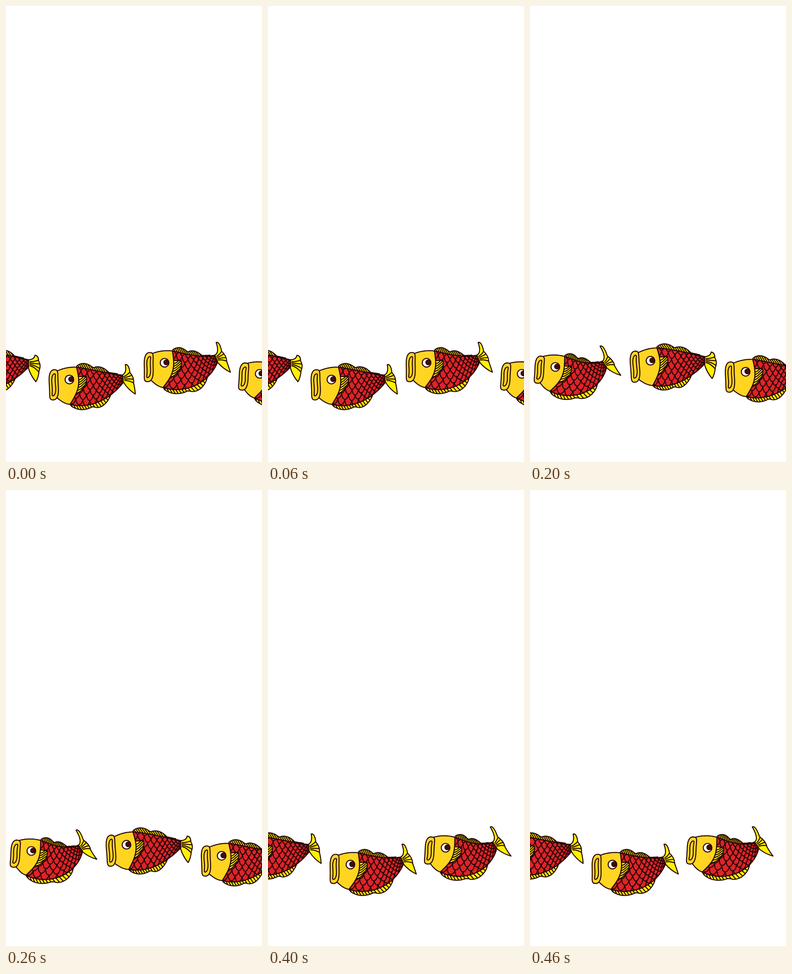
These frames come from a looping animation (561x998 px, 0.5 s). An HTML page with a canvas:

```html
<!DOCTYPE html>
<html lang="en">
<head>
<meta charset="utf-8">
<title>Swimming fish</title>
<style>
  html, body { margin: 0; width: 100%; height: 100%; overflow: hidden; background: #fff; }
  canvas { display: block; }
</style>
</head>
<body>
<canvas id="stage" width="561" height="998"></canvas>
<script>
const ctx = document.getElementById('stage').getContext('2d');
const { sin, cos, abs, max, sign, PI } = Math;
const INK = '#240606', RED = '#dd2429', GOLD = '#ffd522', YELLOW = '#fff200';
const SPINE = 119, RAD = PI / 180;

// Angles of the body at the eye, of the body at the tail joint, and of the tail fin
const POSES = [
  { head: 18, end: -34, tail: -34 },
  { head: 9, end: -24, tail: -24 },
  { head: 4, end: -7, tail: -17 },
  { head: 0, end: 0, tail: 0 },
];
const LANES = [805, 783, 822, 790];

// Outlines are measured from the eye, on a straight spine
const mix = (a, b, t) => a + (b - a) * t;
const lobe = (x, from, to) => x > from && x < to ? sin(PI * (x - from) / (to - from)) ** .6 : 0;
const back = x => -28 + 19 * max(0, (x - 14) / 105) ** 1.3;
const belly = x => { const u = (x - 5) / 114; return 54 + 20 * u - 67 * u * u; };
const dorsal = x => back(x) - max(1.5, 11 * lobe(x, 13, 56), 10 * lobe(x, 48, 88));
const anal = x => belly(x) + max(9 * lobe(x, 5, 62), 13 * lobe(x, 50, 89));
const crown = x => -28 + 14 * ((14 - x) / 48) ** 2;
const chin = x => 38 + 16 * sin((x + 30) / 35 * PI / 2);
const gill = y => { const t = (y + 28) / 82; return mix(14, 5, t) + 11 * sin(PI * t); };
const pectoral = y => gill(y) + 18 * (1 - ((y + 9) / 42) ** 2);

const sample = (from, to, at, n = 24) => Array.from({ length: n + 1 }, (_, i) => at(mix(from, to, i / n)));
const along = (f, from, to) => sample(from, to, x => [x, f(x)]);
const down = (f, from, to) => sample(from, to, y => [f(y), y]);

const BODY = [...along(back, 14, SPINE), ...along(belly, SPINE, 5), ...down(gill, 54, -28)];
const DORSAL = [...along(dorsal, 14, 108), ...along(back, 108, 14)];
const ANAL = [...along(anal, 5, 90), ...along(belly, 90, 5)];
const HEAD = [...along(crown, -34, 14), ...down(gill, -28, 54), ...along(chin, 5, -30)];
const PECTORAL = [...down(gill, 33, -8), ...down(pectoral, -9, 33)];

// Maps a point on the straight fish to the curved one
function bender({ head, end }) {
  const angle = x => (head + (end - head) * max(0, x / SPINE) ** 1.5) * RAD;
  return ([x, y]) => {
    const steps = 12, step = x * (1 - head * .003) / steps;
    let px = 0, py = 0;
    for (let i = 0; i < steps; i++) {
      const a = angle(x * (i + .5) / steps);
      px += step * cos(a);
      py += step * sin(a);
    }
    const a = angle(x);
    return [px - y * sin(a), py + y * cos(a)];
  };
}

function trace(points, bend = p => p) {
  const path = new Path2D();
  points.forEach(p => path.lineTo(...bend(p)));
  return path;
}

function paint(path, fill, details) {
  ctx.fillStyle = fill;
  ctx.fill(path);
  if (details) {
    ctx.save();
    ctx.clip(path);
    details();
    ctx.restore();
  }
  ctx.stroke(path);
}

function rays(bend, from, to, ray) {
  for (let v = from; v <= to; v += 5.5) ctx.stroke(trace(ray(v), bend));
}

function drawScales(bend) {
  const column = c => 17 * c - .5 * c * c;
  for (let row = 0; row < 7; row++) {
    for (let c = row % 2 / 2; c < 10; c++) {
      const scale = sample(0, 1, t => {
        const x = column(c + t), v = (row - .4 + .95 * sin(PI * t) ** .6 + .25 * sin(c * 5 + row * 3)) / 6.5;
        return [x, mix(back(x), belly(x), v)];
      }, 10);
      ctx.stroke(trace(scale, bend));
    }
  }
}

function drawTail(bend, tail) {
  const up = 18 - tail * .6, low = 40, edge = 24 + tail * .2;
  ctx.save();
  ctx.translate(...bend([SPINE, -1]));
  ctx.rotate(tail * RAD);
  const path = new Path2D(`M-1-8Q12-8 14 ${-up}Q22 ${1 - up} ${edge - 2} ${-up * .3}
    Q${edge + 4} 4 ${edge - 1} 16Q${edge - 2} 30 16 ${low}Q4 26 -1 8Z`);
  paint(path, YELLOW, () => {
    for (let i = 0; i < 4; i++) {
      const y = mix(-up * .55, low * .6, i / 3);
      ctx.stroke(new Path2D(`M3 ${i * 3 - 4}Q14 ${y * .3} 27 ${y}`));
    }
  });
  ctx.restore();
}

function drawLips(head) {
  const ring = (w, h) => trace(sample(0, 2 * PI, a => [
    -34 + sign(cos(a)) * abs(cos(a)) ** .75 * w * (.85 + .3 * sin(a) ** 2) + sin(3 * a),
    13 - head * .12 + h * sin(a),
  ], 48));
  const height = 34 - head * .22;
  ctx.save();
  ctx.rotate(head * .45 * RAD);
  paint(ring(11.5, height), GOLD);
  paint(ring(4.5, height - 9), GOLD);
  ctx.restore();
}

function drawEye() {
  const disc = (x, y, r) => { const p = new Path2D(); p.arc(x, y, r, 0, 2 * PI); return p; };
  paint(disc(0, 0, 9.5), '#fff');
  ctx.lineWidth = 1.5;
  paint(disc(3.6, -.8, 5.5), '#4a070b');
}

function drawFish(x, y, pose) {
  const bend = bender(pose);
  ctx.save();
  ctx.translate(x, y);
  ctx.lineWidth = 2.2;
  drawTail(bend, pose.tail);
  paint(trace(DORSAL, bend), YELLOW,
    () => rays(bend, 14, 108, v => [[v + 5, back(v) + 6], [v - 8, back(v) - 12]]));
  paint(trace(ANAL, bend), YELLOW,
    () => rays(bend, 5, 95, v => [[v - 6, belly(v) - 5], [v + 6, belly(v) + 14]]));
  paint(trace(BODY, bend), RED, () => drawScales(bend));
  paint(trace(PECTORAL, bend), YELLOW,
    () => rays(bend, 0, 45, v => [[16, v + 3], [27, v - 4], [40, v - 17]]));
  paint(trace(HEAD, bend), GOLD);
  drawLips(pose.head);
  drawEye();
  ctx.restore();
}

function draw(step) {
  ctx.clearRect(0, 0, 561, 998);
  ctx.strokeStyle = INK;
  ctx.lineJoin = ctx.lineCap = 'round';
  for (let k = step; k < 16; k += 5) {
    const turn = k % 4;
    drawFish(556 - 41.7 * k, LANES[k >> 2] - 2.2 * turn, POSES[turn]);
  }
}

const start = performance.now();
let shown = -1;
function tick() {
  const step = Math.floor((performance.now() - start) / 100) % 5;
  if (step !== shown) draw(shown = step);
  requestAnimationFrame(tick);
}
tick();
</script>
</body>
</html>
```
